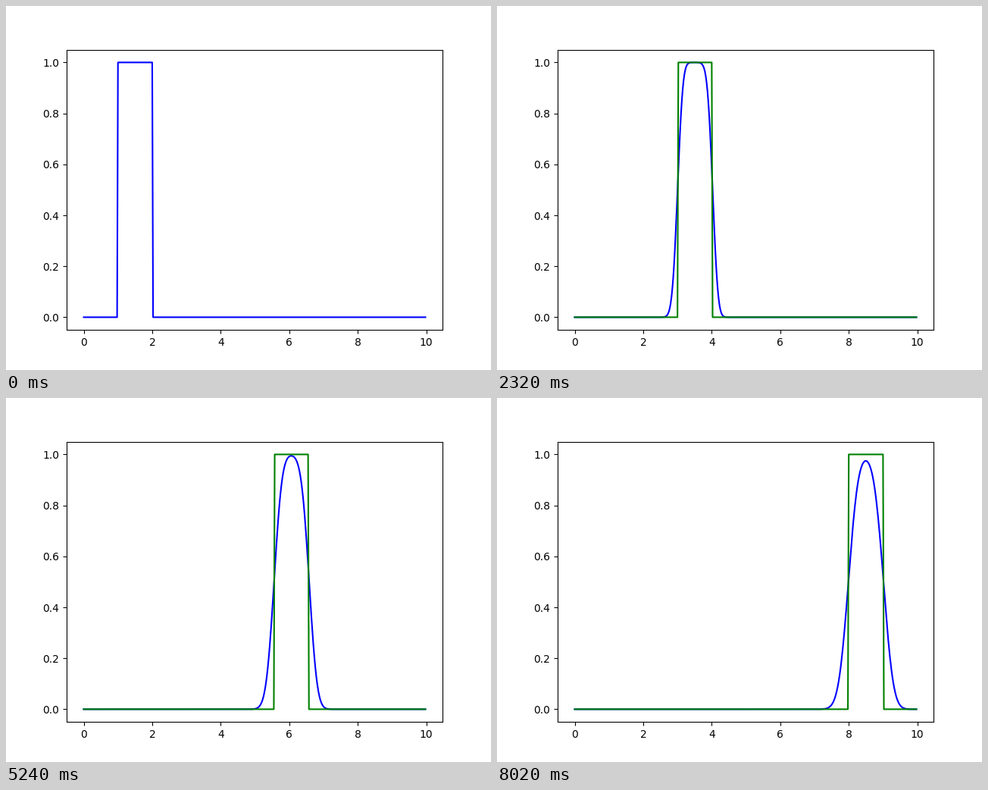
These frames come from a looping animation (640x480 px, 8040 ms). A matplotlib script:

```python
import matplotlib.pyplot as plt
import numpy as np
from matplotlib.animation import FuncAnimation

# Linear advection of a square pulse: first-order upwind against the exact shift
CELLS = 400
DX = 10 / CELLS
COURANT = 0.7
STEPS = 400

cell = np.arange(CELLS)
x = cell * DX


def pulse(step):
    """Exact solution: 1 on the closed interval [1, 2], carried along."""
    pos = np.round((cell - COURANT * step) * DX, 9)
    return ((pos >= 1) & (pos <= 2)).astype(float)


def upwind():
    u = pulse(0)
    states = [u]
    for _ in range(STEPS):
        u = u - COURANT * (u - np.roll(u, 1))
        states.append(u)
    return states


states = upwind()

fig, ax = plt.subplots(figsize=(6.4, 4.8), dpi=100)
numeric, = ax.plot(x, states[0], color="b", lw=1.5)
exact, = ax.plot(x, states[0], color="g", lw=1.5, visible=False)


def update(frame):
    # The opening frame holds the initial pulse alone
    step = max(frame - 1, 0)
    numeric.set_ydata(states[step])
    exact.set_ydata(pulse(step))
    exact.set_visible(frame > 0)
    return numeric, exact


anim = FuncAnimation(fig, update, frames=STEPS + 2, interval=20, repeat=True)

plt.show()
```
